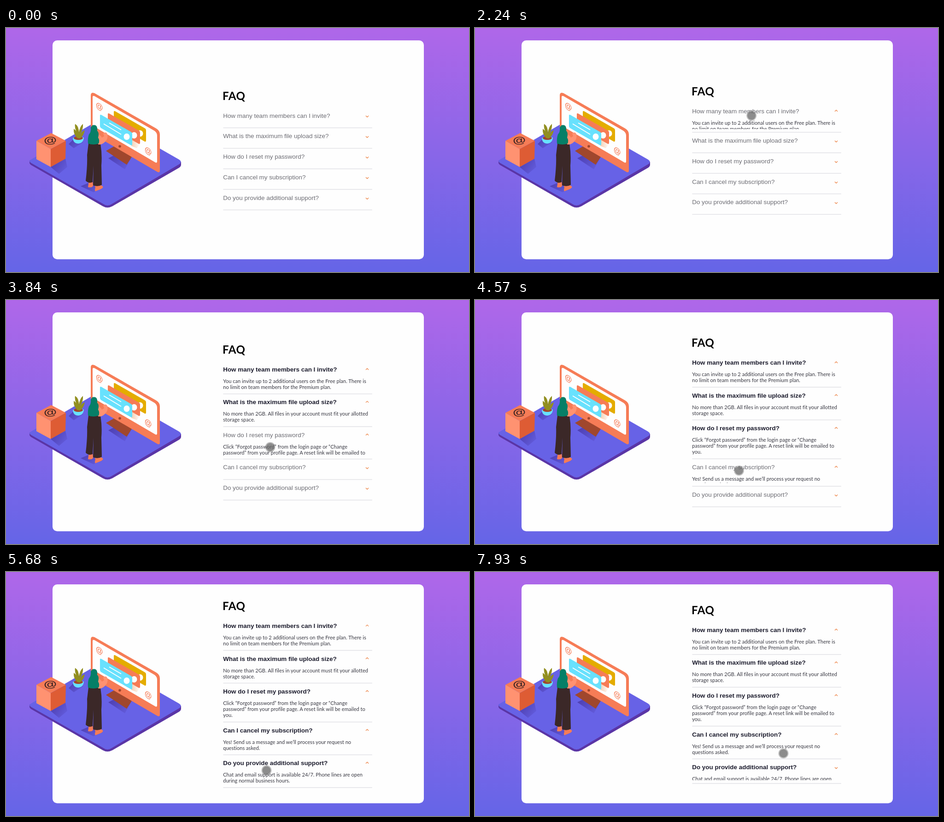
These frames come from a looping animation (1005 px wide and 532 px high, 8 s). An HTML page:

```html
<!DOCTYPE html>
<html lang="en">
<head>
<meta charset="utf-8">
<title>FAQ</title>
<style>
html, body { margin: 0; width: 100%; height: 100%; overflow: hidden; }
#stage { display: block; width: 100vw; height: 100vh; }
.title { font: 700 24px Lato, sans-serif; letter-spacing: .6px; }
.question { font-family: "Liberation Sans", Arial, sans-serif; font-size: 13.44px; }
.answer { font: 11px Lato, sans-serif; letter-spacing: .05px; fill: #35353f; }
.at { font: 700 20px "Liberation Sans", Arial, sans-serif; text-anchor: middle; }
.chevron { fill: none; stroke: #ee8a50; stroke-width: 1.4; }
</style>
</head>
<body>
<svg id="stage" viewBox="0 0 1005 532" preserveAspectRatio="none">
  <defs>
    <linearGradient id="sky" x2="0" y2="1">
      <stop stop-color="#af67e9"/><stop offset="1" stop-color="#6565e7"/>
    </linearGradient>
    <linearGradient id="shade" x2="1" y2=".6">
      <stop stop-color="#43309a" stop-opacity=".75"/><stop offset="1" stop-color="#43309a" stop-opacity=".15"/>
    </linearGradient>
    <linearGradient id="glow" x2="1">
      <stop stop-color="#f0b080" stop-opacity=".6"/><stop offset="1" stop-color="#f0b080" stop-opacity="0"/>
    </linearGradient>
  </defs>
  <rect width="1005" height="532" fill="url(#sky)"/>
  <rect x="101" y="27" width="806" height="477.300" rx="10" fill="#fefefe"/>

  <!-- floor -->
  <path fill="#5a35a6" d="M51 289V294Q51 296.500 54 298.500L210 388.500Q220 394.500 231 388.500L376 304.500Q380 301.500 380 298V292Z"/>
  <path fill="#6762e6" d="M54 287L206 198Q213 193 221 198L376 287Q383 292 376 297L230 383.500Q220 390.500 211 383.500L54 294Q48 290 54 287Z"/>
  <g fill="url(#shade)">
    <path d="M97 303L129 285L133 303L115 318Z"/>
    <path d="M136 253L148 241L168 249L147 262Z"/>
    <path d="M222 284L238 276L272 283L258 308Z"/>
    <path d="M162 345L190 333L210 350L190 358Z"/>
  </g>

  <!-- monitor -->
  <path fill="#a0472d" d="M217 268L238 256L273 281L262 298Z"/>
  <path fill="#f67c56" d="M184 147Q184 139 192 142L326 219Q334 224 334 232V311Q334 316 329 314L184 229Z"/>
  <path fill="#fefefe" d="M188 151Q188 146 193 149L322 224Q328 228 328 235V291Q328 295 324 293L188 213Z"/>
  <circle cx="247" cy="258" r="2.800" fill="#a0472d"/>
  <path fill="url(#glow)" d="M272 243L291 252L284 262L272 257Z"/>
  <g id="cards"></g>
  <g class="at" fill="#f67c56">
    <text transform="matrix(.78 .45 0 .9 202.500 177)">@</text>
    <text transform="matrix(.78 .45 0 .9 308.500 274)">@</text>
  </g>

  <!-- cube -->
  <path fill="#f67c56" d="M98 229L130 246L97 264L66 246Z"/>
  <path fill="#ff9271" d="M66 246L97 264V303L66 286Z"/>
  <path fill="#de5c34" d="M97 264L130 246L129 285L97 303Z"/>
  <text class="at" fill="#3b2424" transform="matrix(1.45 -.15 .3 .95 97.800 251)">@</text>

  <!-- plant -->
  <path fill="#68e1fd" d="M145 240Q146 252 157 252Q168 251 169 239Q157 233 145 240Z"/>
  <ellipse cx="157" cy="240" rx="10" ry="4" fill="#a0472d"/>
  <path fill="#928f20" d="M155 240Q146 232 147 220Q153 223 155 231Q148 217 150 209Q159 215 158 229Q160 215 167 209Q168 220 161 231Q165 225 171 223Q169 235 160 241Z"/>

  <!-- woman -->
  <g fill="#f67c56">
    <path d="M180 333H188L189 344Q187 349 178 347Z"/>
    <path d="M192 341H202L210 345Q212 349 204 352L194 356Q192 354 194 348Z"/>
  </g>
  <path fill="#3b2828" d="M179 252H205Q209 275 207 300L208 342Q199 347 189 343L190 300L188 336Q180 340 173 333Q177 300 176 277Z"/>
  <path fill="#ff9271" d="M197 231Q205 232 208 239L213 236L211 230Q217 225 220 231Q222 241 216 247Q209 255 201 254L196 249Z"/>
  <path fill="#067f67" d="M184 217Q187 210 194 212Q199 214 198 224Q203 229 200 239Q204 245 201 252Q190 256 178 252Q177 240 180 232Q185 227 184 217Z"/>

  <g id="faq"></g>
  <g id="cursor">
    <circle r="11" fill="#777" fill-opacity=".45"/>
    <circle r="9" fill="#606060" fill-opacity=".55"/>
  </g>
</svg>
<script>
const LOOP = 8000, LEFT = 471.2, WIDTH = 323.3;
const TOP = 195.5, PITCH = 44.75, LINE = 13.35;
const CLOSE_AT = 7705, BOLD_DELAY = 385, FADE = 140;

const entries = [
  [1998, "How many team members can I invite?",
    "You can invite up to 2 additional users on the Free plan. There is", "no limit on team members for the Premium plan."],
  [2708, "What is the maximum file upload size?",
    "No more than 2GB. All files in your account must fit your allotted", "storage space."],
  [3540, "How do I reset my password?",
    "Click “Forgot password” from the login page or “Change", "password” from your profile page. A reset link will be emailed to", "you."],
  [4372, "Can I cancel my subscription?",
    "Yes! Send us a message and we’ll process your request no", "questions asked."],
  [5155, "Do you provide additional support?",
    "Chat and email support is available 24/7. Phone lines are open", "during normal business hours."]
];

// time, x, y
const track = [
  [1040, 988, 525], [1105, 976, 469], [1295, 976, 469], [1310, 994, 520], [1390, 940, 440],
  [1570, 705.5, 226.5], [1700, 610, 192], [2250, 600, 191], [2600, 580, 249], [2980, 575, 248],
  [3400, 573, 311], [3760, 573, 313], [3840, 573.5, 320.5], [4150, 573, 372], [4640, 573, 372],
  [5000, 565.5, 432.5], [6460, 565.5, 432.5], [6560, 585, 428], [7000, 956, 513], [7240, 861, 492],
  [7310, 861, 492], [7600, 690, 418], [7750, 690, 417], [7930, 669.5, 395.5], [8000, 669.5, 395.5]
];

const $ = id => document.getElementById(id);

function add(parent, tag, attrs, text) {
  const node = document.createElementNS("http://www.w3.org/2000/svg", tag);
  set(node, attrs);
  if (text) node.textContent = text;
  return parent.appendChild(node);
}

function set(node, attrs) {
  for (const key in attrs) node.setAttribute(key, attrs[key]);
}

const clamp = v => Math.max(0, Math.min(1, v));
const mix = (a, b, k) => a + (b - a) * k;

function drawCard(x, y, fill, dotX, dotY) {
  const g = $("cards");
  add(g, "path", { fill, d: `M${x} ${y + 2}q0 -3 3 -1.500l65 37.500q2 1.500 2 4v22q0 4 -3 2.500l-65 -37.500q-2 -1.500 -2 -4z` });
  add(g, "ellipse", { cx: dotX, cy: dotY, rx: 6.5, ry: 7, fill: "#fefefe" });
}
drawCard(234, 181, "#e4ac00", 291, 230);
drawCard(221, 186, "#f67c56", 278, 234);
drawCard(204, 189, "#68e1fd", 262, 237);
add($("cards"), "path", { d: "M224 207L250 222M212 209L250 232", stroke: "#fefefe", "stroke-width": 2 });

const faq = $("faq");
const title = add(faq, "text", { class: "title", x: LEFT - 1.2 }, "FAQ");
const items = entries.map(([openAt, question, ...lines]) => {
  const label = add(faq, "text", { class: "question", x: LEFT }, question);
  const panel = add(faq, "svg", { x: LEFT - 1, width: WIDTH + 10, overflow: "hidden" });
  lines.forEach((line, i) =>
    add(panel, "text", { class: "answer", x: 1, y: 9.5 + i * LINE }, line));
  return {
    openAt, label, panel,
    full: lines.length * LINE,
    chevron: add(faq, "path", { class: "chevron", d: "M-3 -.3L0 2.700L3 -.3" }),
    rule: add(faq, "rect", { x: LEFT + .3, width: WIDTH, height: 1.4, fill: "#e0e0e5" })
  };
});
const last = items[items.length - 1];

const grow = dt => dt > 0 ? .0155 * dt ** 1.3 : 0;

function extra(item, t) {
  const open = Math.min(item.full, grow(t - item.openAt));
  return item === last ? Math.max(0, open - grow(t - CLOSE_AT)) : open;
}

function ink(k) {
  return `rgb(${mix(108, 28, k)},${mix(108, 28, k)},${mix(115, 45, k)})`;
}

function pointer(t) {
  const i = track.findIndex(p => p[0] > t);
  if (i < 1) return null;
  const [a, b] = [track[i - 1], track[i]];
  const k = (t - a[0]) / (b[0] - a[0]);
  return { x: mix(a[1], b[1], k), y: mix(a[2], b[2], k) };
}

function render(t) {
  const sizes = items.map(item => extra(item, t));
  const shift = -sizes.reduce((a, b) => a + b) / 2;
  const spot = pointer(t);
  let hidden = !spot;
  let y = TOP + shift;

  set(title, { y: Math.round(156.7 + shift) });
  items.forEach((item, i) => {
    const base = Math.round(y);
    const isOpen = t >= item.openAt && !(item === last && t >= CLOSE_AT);
    const k = t - item.openAt - BOLD_DELAY;
    set(item.label, { y: base, "font-weight": k >= 0 ? 700 : 400, fill: ink(k < 0 ? 0 : .3 + .7 * clamp(k / FADE)) });
    set(item.chevron, { transform: `translate(784 ${y - 4}) scale(1 ${isOpen ? -1 : 1})` });
    set(item.panel, { y: base + 15, height: sizes[i] });
    set(item.rule, { y: y + 21.4 + sizes[i] });

    // the round pointer is not drawn while it hovers a question
    if (spot && spot.x > LEFT && spot.x < LEFT + WIDTH && Math.abs(spot.y - (y - 4.5)) < 7.3) hidden = true;
    y += PITCH + sizes[i];
  });

  set($("cursor"), { visibility: hidden ? "hidden" : "visible" });
  if (spot) set($("cursor"), { transform: `translate(${spot.x} ${spot.y})` });
}

const start = performance.now();
function tick() {
  render((performance.now() - start) % LOOP);
  requestAnimationFrame(tick);
}
tick();
</script>
</body>
</html>
```
